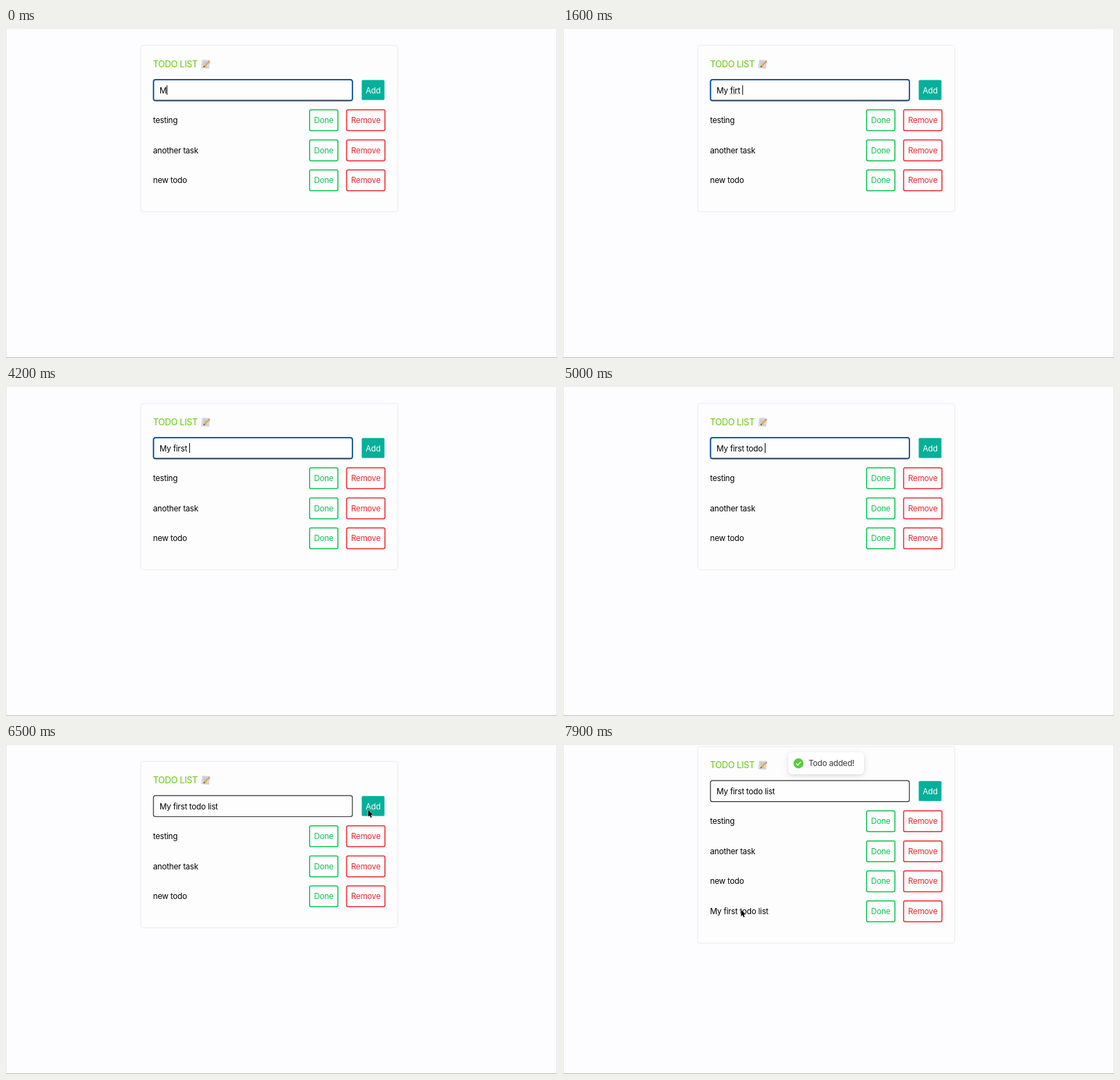
These frames come from a looping animation (800x479 px, 8 s). An HTML page:

```html
<!DOCTYPE html>
<html lang="en">
<head>
<meta charset="utf-8">
<title>Todo list</title>
<style>
  html, body { margin: 0; width: 100%; height: 100%; overflow: hidden; background: #fdfcfe; }
  svg { display: block; width: 800px; height: 479px; }
  text { font: 400 11.6px Inter, "Open Sans", sans-serif; letter-spacing: -0.21px; white-space: pre; }
  .mid { text-anchor: middle; }
  .title { font-size: 12.8px; letter-spacing: -0.3px; fill: #66c80a; }
  .card { fill: #fdfdfe; filter: drop-shadow(0 .7px 1.1px rgba(0,0,0,.17)); }
  .toast { fill: #fff; filter: drop-shadow(0 2px 4px rgba(0,0,0,.12)) drop-shadow(0 1px 1px rgba(0,0,0,.05)); }
</style>
</head>
<body>
<svg viewBox="0 0 800 479">
  <rect width="800" height="479" fill="#fdfcfe"/>
  <path d="M.5 479V.5H799.5V479" fill="none" stroke="#e9e8ea"/>
  <path d="M0 478.5H800" stroke="#bdbcbe"/>

  <g id="page">
    <rect id="card" class="card" x="196.3" y="26" width="371.8" height="240" rx="3"/>
    <text class="title" x="213.5" y="57">TODO LIST</text>
    <g id="memo">
      <path d="M285.2 46.6L295.3 47.1L294.6 58.6L284 57.8Z" fill="#d9dce0" stroke="#b4b8be" stroke-width=".5"/>
      <path d="M286.6 49.2l6 .3M286.4 51.4l5 .3M286.2 53.6l3 .2M286 55.8l6.6 .5" stroke="#9ba1a9" stroke-width=".6"/>
      <path d="M288.2 55.6L294.6 49.2" stroke="#f0a22e" stroke-width="2.3"/>
      <path d="M294.2 49.6L295.6 48.2" stroke="#d9808a" stroke-width="2.3"/>
      <path d="M286.6 57.2L287.4 54.8L289 56.4Z" fill="#4a4038"/>
    </g>

    <rect id="field" x="214.1" y="74.9" width="288.8" height="30.6" rx="3" fill="#fefefe" stroke="#333" stroke-width="1.2"/>
    <g id="focus" fill="none" stroke-width="1.8">
      <rect x="214.3" y="75" width="288.6" height="30.4" rx="3" stroke="#1259b4"/>
      <path d="M217 105.4H500" stroke="#3a4757"/>
    </g>
    <text id="typed" x="223" y="94.5"></text>
    <path id="squiggle" d="M242 95.7H257.5" stroke="#b0605f" stroke-width="1" stroke-dasharray="1.2 1"/>
    <rect id="caret" y="83" width="1" height="14"/>

    <rect x="516.5" y="75.5" width="33" height="29" rx="1.5" fill="#04b09a"/>
    <text class="mid" x="533" y="94.5" fill="#fff">Add</text>
    <g id="rows"></g>
  </g>

  <g id="toast">
    <rect class="toast" x="327" y="12" width="110" height="32" rx="6"/>
    <circle id="disc" cx="341.9" cy="28.1" r="7.3" fill="#58cd3e"/>
    <path id="tick" d="M338.7 28.4L341 30.7L345.2 26" fill="none" stroke="#fff" stroke-width="1.6" stroke-dasharray="9.6 20"/>
    <text x="356.5" y="32" fill="#363636">Todo added!</text>
  </g>

  <path id="mouse" d="M0 0V9.8L2.2 7.7L3.7 11.2L5.3 10.5L3.8 7.1H6.9Z" stroke="#fff" stroke-width=".8" paint-order="stroke"/>
</svg>

<script>
const LOOP = 8000, ADD = 6583, BLUR = 6500, PITCH = 43.6;
const GREEN = '#0cc251', RED = '#ee2932', HOT = [251, 36, 48];
const $ = id => document.getElementById(id);
const NS = 'http://www.w3.org/2000/svg';

// [time, input text, caret hidden]
const typing = [
  [0, 'M'], [100, 'My'], [300, 'My '], [500, 'My f'], [700, 'My fi'],
  [900, 'My fir'], [1200, 'My firt'], [1500, 'My firt '],
  [1900, 'My firt'], [2000, 'My fir'], [2200, 'My fi'], [2600, 'My fi', true],
  [2800, 'My fi'], [3200, 'My fi', true], [3500, 'My fir'],
  [3800, 'My firs'], [3900, 'My first'], [4100, 'My first '],
  [4500, 'My first t'], [4600, 'My first to'], [4700, 'My first tod'],
  [4900, 'My first todo'], [5000, 'My first todo '], [5200, 'My first todo l'],
  [5300, 'My first todo li'], [5400, 'My first todo lis'],
  [5500, 'My first todo list'], [6000, 'My first todo list', true]
];

// [time, x, y] of the pointer tip
const path = [
  [6000, 470, 185], [6400, 527, 94], [ADD, 525, 97], [6800, 476.7, 111.5],
  [7150, 400, 134], [7600, 400, 134], [7850, 258.5, 240.4]
];

const clamp = v => Math.max(0, Math.min(1, v));
const smooth = v => v * v * (3 - 2 * v);

function bezier(x1, y1, x2, y2) {
  const at = (s, a, b) => 3 * s * (1 - s) ** 2 * a + 3 * s * s * (1 - s) * b + s ** 3;
  return x => {
    if (x <= 0 || x >= 1) return clamp(x);
    let lo = 0, hi = 1;
    for (let i = 0; i < 24; i++) {
      const mid = (lo + hi) / 2;
      if (at(mid, x1, x2) < x) lo = mid; else hi = mid;
    }
    return at(lo, y1, y2);
  };
}
const enter = bezier(.21, 1.02, .73, 1);
const pop = bezier(.175, .885, .32, 1.275);

function make(parent, tag, attrs, label = '') {
  const el = document.createElementNS(NS, tag);
  for (const k in attrs) el.setAttribute(k, attrs[k]);
  el.textContent = label;
  return parent.appendChild(el);
}

function button(row, x, w, y, color, label) {
  const box = make(row, 'rect', {
    x: x + .75, y: y + .75, width: w - 1.5, height: 30.2, rx: 2.2,
    fill: '#fefefe', stroke: color, 'stroke-width': 1.5
  });
  const text = make(row, 'text', { class: 'mid', x: x + w / 2, y: y + 20, fill: color }, label);
  return { box, text };
}

const rows = ['testing', 'another task', 'new todo', 'My first todo list'].map((name, i) => {
  const y = 118.1 + i * PITCH;
  const row = make($('rows'), 'g', {});
  make(row, 'text', { x: 213.5, y: y + 20 }, name);
  button(row, 440, 42.6, y, GREEN, 'Done');
  return { row, remove: button(row, 493.8, 57.2, y, RED, 'Remove') };
});

function pointer(t) {
  let i = path.findLastIndex(p => p[0] <= t);
  if (i < 0) return null;
  const a = path[i], b = path[i + 1] || a;
  const k = b === a ? 0 : smooth((t - a[0]) / (b[0] - a[0]));
  return [a[1] + (b[1] - a[1]) * k, a[2] + (b[2] - a[2]) * k];
}

const show = (el, on) => el.setAttribute('visibility', on ? 'visible' : 'hidden');
const mix = (a, b, k) => `rgb(${a.map((v, i) => Math.round(v + (b[i] - v) * k))})`;

function drawInput(t) {
  const [, text, hidden] = typing.findLast(s => s[0] <= t);
  if ($('typed').textContent !== text) $('typed').textContent = text;
  $('caret').setAttribute('x', 223 + $('typed').getComputedTextLength());
  show($('caret'), !hidden && t < BLUR);
  show($('focus'), t < BLUR);
  show($('squiggle'), text === 'My firt ');
}

function drawToast(age) {
  show($('toast'), age >= 0);
  const e = enter(age / 350);
  $('toast').setAttribute('transform',
    `translate(382 ${28 - 64 * (1 - e)}) scale(${.6 + .4 * e}) translate(-382 -28)`);
  $('toast').setAttribute('opacity', .5 + .5 * e);
  $('disc').setAttribute('r', 7.3 * pop((age - 100) / 300));
  const drawn = 9.6 * smooth(clamp((age - 200) / 200));
  $('tick').setAttribute('stroke-dasharray', `${drawn} 20`);
}

function draw(t) {
  const added = t >= ADD;
  $('page').setAttribute('transform', `translate(0 ${added ? -PITCH / 2 : 0})`);
  $('card').setAttribute('height', added ? 240 + PITCH + 1 : 240);
  show(rows[3].row, added);
  drawInput(t);
  drawToast(t - ADD);

  const heat = clamp((t - ADD) / 150) - clamp((t - 6830) / 150);
  const { box, text } = rows[0].remove;
  box.setAttribute('fill', mix([254, 254, 254], HOT, heat));
  text.setAttribute('fill', mix([238, 41, 50], [255, 255, 255], heat));

  const tip = pointer(t);
  show($('mouse'), tip);
  if (tip) $('mouse').setAttribute('transform', `translate(${tip})`);
}

const start = performance.now();
function tick() {
  draw((performance.now() - start) % LOOP);
  requestAnimationFrame(tick);
}
tick();
</script>
</body>
</html>
```
